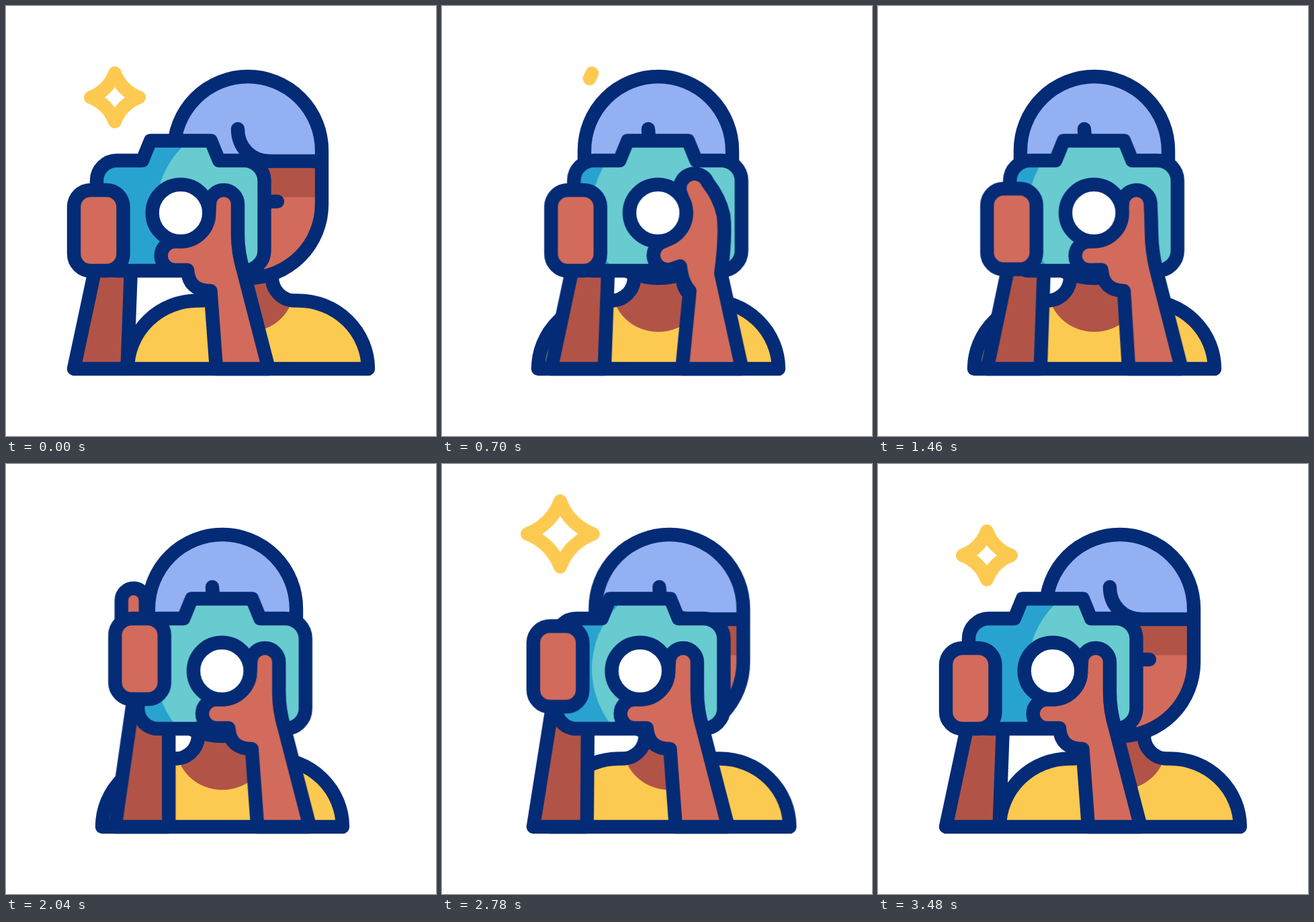
Write an HTML page without scripts that moves like this. It is 640x640 px and loops after 3600 ms.

```html
<!DOCTYPE html>
<html lang="en">
<head>
<meta charset="utf-8">
<title>Photographer</title>
<style>
  html, body { margin: 0; width: 100%; height: 100%; overflow: hidden; background: #fff; }
  svg { display: block; width: 100vw; height: 100vh; }

  .line { stroke: #042b76; stroke-width: 20.4; stroke-linecap: round; stroke-linejoin: round; }
  .open { fill: none; }
  .skin { fill: #d26b5b; }
  .shade { fill: #b15447; }
  .cloth { fill: #fdca51; }
  .cap { fill: #93b0f3; }
  .teal { fill: #28a3cf; }
  .shine { fill: #68cbd0; }
  .lens { fill: #fff; }
  .star { fill: none; stroke: #fdca51; stroke-width: 20; stroke-linecap: round; stroke-linejoin: round; vector-effect: non-scaling-stroke; }

  .person, .camera, .shine, .grip, .forearm, .finger, .zoom, .pop, .star {
    animation: 3600ms cubic-bezier(.333, 0, .667, 1) infinite;
  }
  .person { animation-name: person; }
  .camera { animation-name: camera; }
  .shine { animation-name: shine; }
  .grip { animation-name: grip; }
  .forearm { animation-name: forearm; }
  .finger { animation-name: finger; }
  .zoom { animation-name: zoom; }
  .pop { animation-name: pop; transform-origin: 220.5px 225px; }
  .star { animation-name: trim; }

  /* Turning to the front and back again */
  @keyframes person {
    0%, 85.3%, 100% { transform: none; }
    14.7%, 70.55% { transform: translateX(-38px); }
  }
  @keyframes camera {
    0%, 85.3%, 100% { transform: none; }
    14.7%, 70.55% { transform: translateX(61.3px); }
  }
  /* Keeps the highlight still while the camera slides */
  @keyframes shine {
    0%, 85.3%, 100% { transform: none; }
    14.7%, 70.55% { transform: translateX(-61.3px); }
  }

  /* Shutter hand */
  @keyframes grip {
    0%, 38.6%, 87.5%, 100% { transform: none; }
    53.3%, 72.2% { transform: translateY(-44px); }
  }
  @keyframes forearm {
    0%, 38.6%, 87.5%, 100% { d: path("M133 390 L101 540 L180.5 540 L186 390"); }
    53.3%, 72.2% { d: path("M129 346 L101 540 L181 540 L181 346"); }
  }
  @keyframes finger {
    0%, 38.6%, 63.9%, 100% { transform: translateY(50px); }
    53.3%, 58.3% { transform: none; }
  }

  /* Lens hand */
  @keyframes zoom {
    0%, 15%, 27.8%, 41.7%, 100% {
      d: path("M391 540 L353 393 Q345 366 345 340 Q345 318 345 295 A21 21 0 0 0 303 295 L302 308 A42 42 0 0 1 260 350.5 L252 350.5 A21 21 0 0 0 252 393 L270 393 Q272 424 304.5 424 L313 540 Z");
    }
    20%, 34.4% {
      d: path("M385 540 L354 398 Q362 340 358 310 Q352 284 334 262 A21 21 0 0 0 294 279 L299 292 A42 42 0 0 1 276 347 L268 351 A21 21 0 0 0 283 391 L294 387 Q297 412 307.5 424 L295.5 540 Z");
    }
  }

  /* Flash star */
  @keyframes pop {
    0%, 22.2% { transform: scale(1); }
    22.21%, 63.9% { transform: scale(0); }
    73.9% { transform: scale(1.4); }
    90.6%, 100% { transform: scale(1); }
  }
  @keyframes trim {
    0% { stroke-dasharray: 208px 900px; }
    22.2% { stroke-dasharray: 0px 900px; }
    22.21%, 100% { stroke-dasharray: 900px 900px; }
  }
</style>
</head>
<body>
<svg viewBox="0 0 640 640" role="img" aria-label="Photographer taking a picture">
  <defs>
    <path id="torso" d="M181 540 A104 102 0 0 1 285 438.5 H290 A34 34 0 0 0 324 404 V380 H396 V404 A34 34 0 0 0 430 438.5 H435 A104 102 0 0 1 539 540 Z"/>
    <path id="head" d="M250 215 A110 110 0 0 1 470 215 V295 A110 110 0 0 1 250 295 Z"/>
    <path id="body" d="M165 230 H203 L215 200.5 H305 L317 230 H354 A30 30 0 0 1 384.5 260 V364 A30 30 0 0 1 354 394 H165 A30 30 0 0 1 135 364 V260 A30 30 0 0 1 165 230 Z"/>
    <clipPath id="inTorso"><use href="#torso"/></clipPath>
    <clipPath id="inHead"><use href="#head"/></clipPath>
    <clipPath id="inBody"><use href="#body"/></clipPath>
  </defs>

  <g class="person">
    <use href="#torso" class="cloth"/>
    <ellipse class="shade" cx="360" cy="419" rx="69" ry="66" clip-path="url(#inTorso)"/>
    <use href="#torso" class="line open"/>
    <use href="#head" class="skin"/>
    <g clip-path="url(#inHead)">
      <rect class="shade" x="240" y="231" width="240" height="53.5"/>
      <rect class="cap" x="240" y="95" width="240" height="136"/>
    </g>
    <path class="line open" d="M345 183 C345 210 365 231 393 231 H470 M380 291 H404"/>
    <use href="#head" class="line open"/>
  </g>

  <g class="camera">
    <g class="pop">
      <path class="star" d="M162 100 Q152 126 126 136 Q152 146 162 172 Q172 146 198 136 Q172 126 162 100 Z"/>
    </g>
    <path class="line shade forearm" d="M133 390 L101 540 L180.5 540 L186 390"/>
    <use href="#body" class="teal"/>
    <g clip-path="url(#inBody)"><circle class="shine" cx="358" cy="305" r="135"/></g>
    <use href="#body" class="line open"/>
    <g class="grip">
      <rect class="line skin finger" x="110.5" y="229" width="36" height="80" rx="18"/>
      <rect class="line skin" x="101" y="274" width="73.5" height="120" rx="25"/>
    </g>
    <path class="line skin zoom" d="M391 540 L353 393 Q345 366 345 340 Q345 318 345 295 A21 21 0 0 0 303 295 L302 308 A42 42 0 0 1 260 350.5 L252 350.5 A21 21 0 0 0 252 393 L270 393 Q272 424 304.5 424 L313 540 Z"/>
    <circle class="line lens" cx="260" cy="308" r="42.3"/>
  </g>
</svg>
</body>
</html>
```
